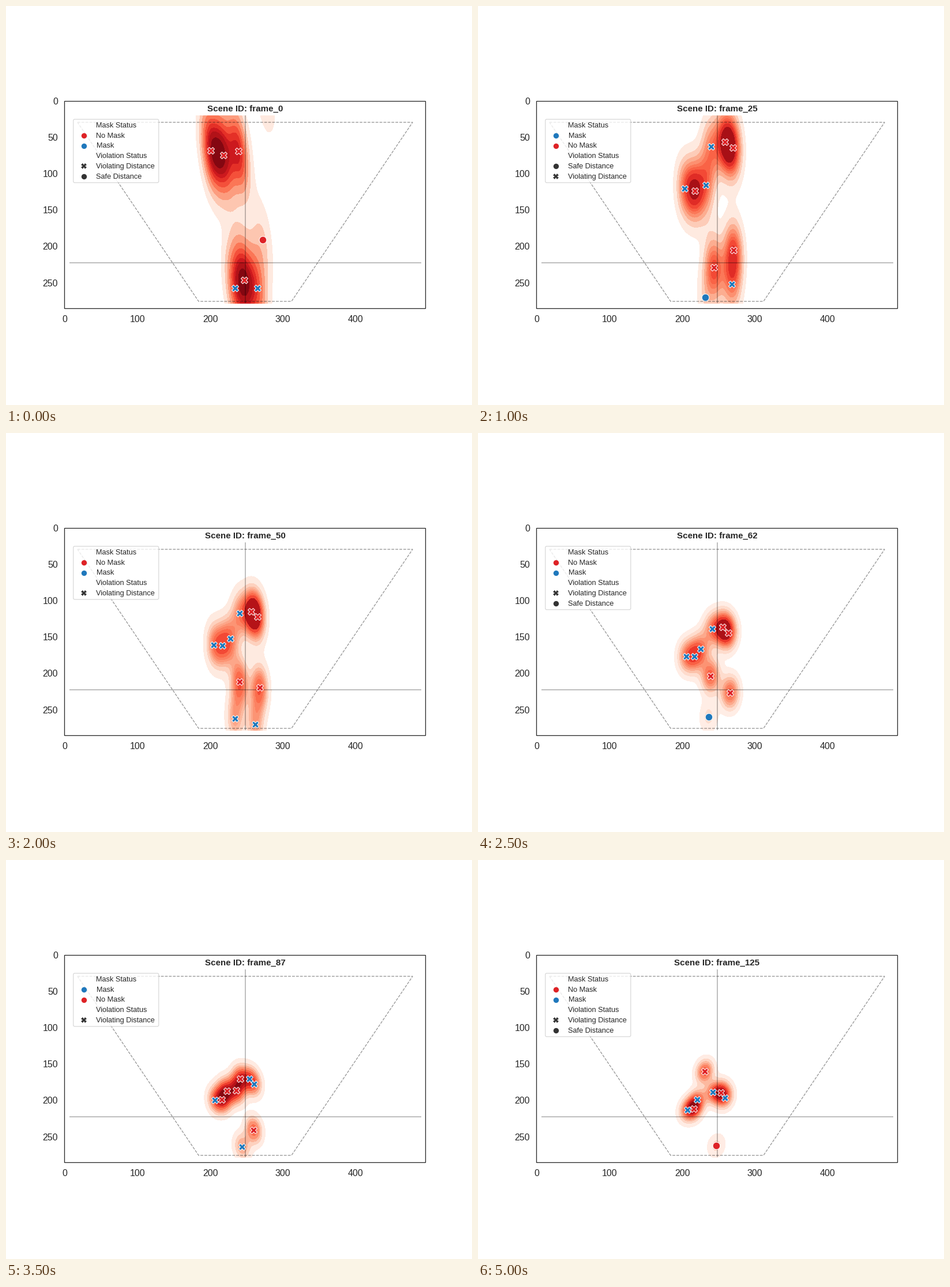
Recreate the animation shown at these times as a matplotlib script. Size 808 by 693 pixels, loop 5.5 s.

```python
import numpy as np
import matplotlib.pyplot as plt
from matplotlib.animation import FuncAnimation
from matplotlib.patches import FancyBboxPatch, Rectangle

W, H, DPI = 808, 693, 100
PT = 72 / DPI
INK, RED, BLUE = "#262626", "#de2226", "#1f78bc"
SCENES, END = 11, 125
TOP, BOTTOM = 20, 278
SAFE_DISTANCE = 37.5
BW_ADJUST = .6

plt.rcParams["font.family"] = "Liberation Sans"


def linear(u):
    return u


def ease_in(u):
    return u ** 2


def ease_out(u):
    return 1 - (1 - u) ** 2


def walker(masks, start, end, ease_x=linear, ease_y=linear, span=(0, END), bow=0):
    """A person: path in plot units, and per scene N/M (no mask / mask) or - (away)."""
    def at(t):
        u = (t - span[0]) / (span[1] - span[0])
        x = start[0] + (end[0] - start[0]) * ease_x(u)
        y = start[1] + (end[1] - start[1]) * ease_y(u)
        return x, y - bow * np.sin(np.pi * u)
    return masks, at


def incoming(masks, start, end):
    return walker(masks, start, end, ease_out, ease_out)


WALKERS = [
    incoming("NNMMMMMMNNM", (201, 68), (207, 213)),
    incoming("NNNNMMNNNNN", (218, 74), (216, 211)),
    incoming("NMMMMMNNNNM", (239, 69), (221, 199)),
    incoming("--MMMMNNNNM", (238, -8), (242, 188)),
    incoming("-NNNNNMMNNN", (262, -18), (253, 189)),
    incoming("NNNNNNMMMMM", (276, -10), (259, 196)),
    walker("N" * SCENES, (247, 246), (231, 160)),
    walker("N" * SCENES, (272, 191), (247, 262), ease_x=ease_in),
    walker("MM---------", (234, 257), (234, 270), span=(0, 12)),
    walker("MM---------", (265, 257), (264, 270), span=(0, 12)),
    walker("--MMM------", (268, 252), (262, 270), span=(25, 50)),
    walker("--MMMMMMMM-", (232, 270), (257, 276), ease_x=ease_in,
           span=(25, 115), bow=13),
]
# Who heads the legend: N/M, lower case when the safe group comes first.
LEAD = "NMmNNNNMMNN"

GX, GY = np.meshgrid(np.linspace(150, 320, 201), np.linspace(TOP, BOTTOM, 218))


def px(x):
    return 102 + 1.26 * x


def py(y):
    return 165 + 1.2636 * y


def people(i):
    """Positions, no-mask flags and too-close flags of everyone in a scene."""
    t = END * i // (SCENES - 1)
    here = [(m[i], at(t)) for m, at in WALKERS if m[i] != "-"]
    pts = np.array([p for _, p in here])
    bare = np.array([m == "N" for m, _ in here])
    gaps = np.hypot(*(pts[:, None] - pts[None]).T)
    np.fill_diagonal(gaps, np.inf)
    return t, pts, bare, gaps.min(axis=0) < SAFE_DISTANCE


def density(pts, risk):
    """Weighted Gaussian kernel density with Scott's bandwidth."""
    n_eff = risk.sum() ** 2 / (risk ** 2).sum()
    bw = BW_ADJUST * n_eff ** (-1 / 6)
    inv = np.linalg.inv(np.cov(pts.T, aweights=risk) * bw ** 2)
    z = np.zeros_like(GX)
    for (x, y), w in zip(pts, risk):
        dx, dy = GX - x, GY - y
        q = inv[0, 0] * dx ** 2 + 2 * inv[0, 1] * dx * dy + inv[1, 1] * dy ** 2
        z += w * np.exp(-q / 2)
    return z


def mass_levels(z, count=10, thresh=.05):
    """Contour levels that leave out equal steps of the total mass."""
    v = np.sort(z.ravel())[::-1]
    cum = np.cumsum(v) / v.sum()
    idx = np.searchsorted(cum, 1 - np.linspace(thresh, 1, count))
    return v[np.minimum(idx, len(v) - 1)]


fig = plt.figure(figsize=(W / DPI, H / DPI), dpi=DPI, facecolor="white")
ax = fig.add_axes([0, 0, 1, 1])


def label(x, y, text, size, **kw):
    ax.text(x, y, text, fontsize=size * PT, color=INK, va="baseline", **kw)


def line(xs, ys, width, alpha, style="-"):
    ax.plot(xs, ys, style, color="black", alpha=alpha, lw=width * PT, zorder=3,
            solid_capstyle="butt")


def mark(x, y, shape, color, size, edge, z):
    ax.plot([x], [y], shape, color=color, ms=size * PT, mec="white",
            mew=edge * PT, zorder=z)


def draw_axes():
    ax.add_patch(Rectangle((101, 165), 626, 360, fill=False, ec=INK,
                           lw=1.3 * PT, zorder=6))
    for v in range(0, 500, 100):
        label(px(v), 549, str(v), 16, ha="center")
    for v in range(0, 300, 50):
        label(90, py(v) + 5.7, str(v), 16, ha="right")
    line([124, 705, 495, 334, 124], [202, 202, 513, 513, 202], 1.3, .42, "--")
    line([110, 720], [445.6, 445.6], 2, .25)
    line([414.5, 414.5], [py(TOP), py(BOTTOM)], 2, .25)


def draw_legend(lead, any_safe):
    masks = [("No Mask", "o", RED), ("Mask", "o", BLUE)]
    dists = [("Violating Distance", "X", "#333333")]
    if any_safe:
        dists.append(("Safe Distance", "o", "#333333"))
    if lead in "Mm":
        masks.reverse()
    if lead.islower():
        dists.reverse()
    rows = [("Mask Status", None, None), *masks,
            ("Violation Status", None, None), *dists]
    ax.add_patch(FancyBboxPatch(
        (119, 199), 143.5, 17.75 * len(rows) - 1,
        boxstyle="round,pad=2.3,rounding_size=2.5",
        fc=(1, 1, 1, .8), ec=(.8, .8, .8, .8), lw=1.2 * PT, zorder=7))
    for i, (text, shape, color) in enumerate(rows):
        y = 206.5 + 17.75 * i
        label(156.5, y + 4.4, text, 12.8, zorder=8)
        if shape:
            mark(134.5, y + .6, shape, color, 9.4, 0, 8)


def draw(i):
    t, pts, bare, close = people(i)
    seen = pts[:, 1] >= TOP
    ax.clear()
    ax.set_xlim(0, W)
    ax.set_ylim(H, 0)
    ax.axis("off")
    z = density(pts, np.where(close, 2. + bare, 1.))
    ax.contourf(px(GX), py(GY), z, levels=mass_levels(z), cmap="Reds", zorder=1)
    draw_axes()
    for k in np.flatnonzero(seen)[::-1]:
        mark(px(pts[k, 0]), py(pts[k, 1]), "X" if close[k] else "o",
             RED if bare[k] else BLUE, 12.6, 1, 5)
    draw_legend(LEAD[i], (seen & ~close).any())
    label(414.5, 182.6, f"Scene ID: frame_{t}", 15.1,
          ha="center", weight="bold", zorder=8)
    return []


anim = FuncAnimation(fig, draw, frames=SCENES, interval=500,
                     init_func=lambda: [], repeat=True, repeat_delay=0)
plt.show()
```
